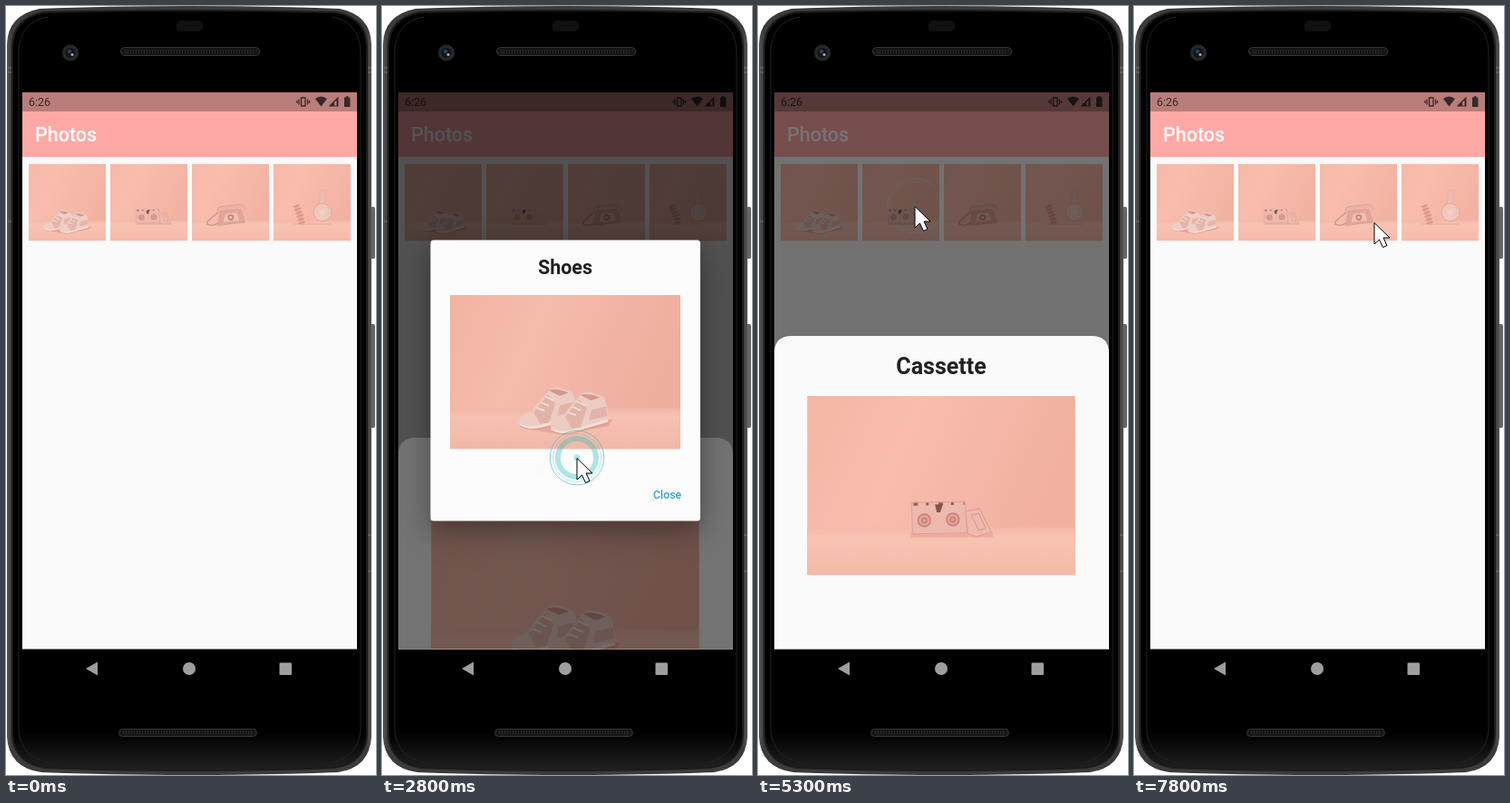
Recreate the animation shown at these times as an HTML page. Size 408 px wide and 846 px high, loop 8000 ms.

```html
<!DOCTYPE html>
<html lang="en">
<head>
<meta charset="utf-8">
<title>Photos</title>
<style>
  html, body { margin: 0; width: 100%; height: 100%; overflow: hidden; background: #fff; }
  svg { display: block; }
  #stage { width: 100vw; height: 100vh; }
  text { font-family: Roboto, sans-serif; }
  .title { font-weight: 700; fill: #212121; text-anchor: middle; }
  #card { filter: drop-shadow(0 9px 12px rgba(0, 0, 0, .24)) drop-shadow(0 12px 22px rgba(0, 0, 0, .16)); }
</style>
</head>
<body>
<svg id="stage" viewBox="0 0 408 846">
  <defs>
    <linearGradient id="wall" x2="1" y2=".3">
      <stop offset="0" stop-color="#f4b6a5"/><stop offset=".4" stop-color="#f8bdad"/><stop offset="1" stop-color="#f1b0a0"/>
    </linearGradient>
    <linearGradient id="floor" x2="0" y2="1">
      <stop offset="0" stop-color="#f4b8a8"/><stop offset=".2" stop-color="#f9c3b4"/><stop offset="1" stop-color="#f5baa9"/>
    </linearGradient>
    <linearGradient id="rim">
      <stop offset="0" stop-color="#585858"/><stop offset=".012" stop-color="#3b3b3b"/>
      <stop offset=".988" stop-color="#3b3b3b"/><stop offset="1" stop-color="#585858"/>
    </linearGradient>
    <linearGradient id="glass" x2="0" y2="1">
      <stop offset=".95" stop-color="#000"/><stop offset="1" stop-color="#222"/>
    </linearGradient>
    <clipPath id="screen"><path d="M18 95h369v612.500H18z"/></clipPath>

    <g id="room">
      <path fill="url(#wall)" d="M0 0h300v200H0z"/>
      <path fill="url(#floor)" d="M0 147h300v53H0z"/>
    </g>
    <g id="shoe">
      <path fill="#efcec5" d="M131 172C130 164 137 160 147 157L166 134Q172 124 184 126L201 133Q207 150 206 165L161 178Q139 183 131 172z"/>
      <path fill="#dfa79c" opacity=".6" d="M150 158L168 135L178 147L170 172L158 173zM184 149l19-4 2 12-24 6z"/>
      <path fill="none" stroke="#fae2dc" stroke-width="3" d="M132 174Q142 181 161 176L205 163"/>
      <path fill="none" stroke="#fae2dc" stroke-width="2" d="M153 152l11 4M159 145l11 5M165 138l11 5"/>
      <path fill="none" stroke="#d8968a" d="M132 176Q144 183 161 179L206 166"/>
      <path fill="#d79a8e" d="M170 130Q180 126 195 133L184 137z"/>
    </g>
    <symbol id="shoes" viewBox="0 0 300 200">
      <use href="#room"/>
      <path fill="#dd9a8c" opacity=".6" d="M92 168Q140 158 212 162L206 170L150 181Q110 178 92 168z"/>
      <use href="#shoe" x="-41" y="-6"/><use href="#shoe"/>
    </symbol>
    <symbol id="cassette" viewBox="0 0 300 200">
      <use href="#room"/>
      <path fill="#e3a194" opacity=".6" d="M116 152h92v6H116z"/>
      <path fill="#edb9ae" stroke="#dda094" d="M117 119l60-1 2 35-61 1z"/>
      <path fill="none" stroke="#975d52" stroke-width="3" stroke-dasharray="5 9 3 11" d="M119 121l57-1"/>
      <path fill="#86564d" d="M143 121h9l-3 9h-4z"/>
      <g fill="#e3a095" stroke="#c48276" stroke-width="1.500">
        <circle cx="131" cy="139" r="7"/><circle cx="163" cy="138" r="7"/>
        <circle cx="131" cy="139" r="2.500"/><circle cx="163" cy="138" r="2.500"/>
      </g>
      <path fill="#efb9ae" stroke="#d99f93" d="M177 129l16-3 13 26-17 5-9-3z"/>
      <path fill="none" stroke="#d3958a" d="M184 133l8-2 8 17-8 2z"/>
    </symbol>
    <symbol id="phone" viewBox="0 0 300 200">
      <use href="#room"/>
      <path fill="none" stroke="#d09184" stroke-width="3" d="M124 121Q100 140 90 150Q85 160 104 159Q118 157 122 149"/>
      <path fill="#e2a598" stroke="#c98a7d" d="M124 122l52-4 12 34-72 8z"/>
      <path fill="#efc0b3" d="M136 130l30-3 7 20-41 4z"/>
      <circle cx="151" cy="139" r="8" fill="#c48579"/><circle cx="151" cy="139" r="4" fill="#efc0b3"/>
      <path fill="none" stroke="#e9b3a6" stroke-width="8" stroke-linecap="round" d="M119 122Q120 112 134 114L170 110Q184 107 186 117"/>
      <path fill="none" stroke="#cb8d80" d="M116 127Q114 109 133 110L170 106Q187 104 190 119"/>
    </symbol>
    <symbol id="paddle" viewBox="0 0 300 200">
      <use href="#room"/>
      <path fill="#e9ab9d" opacity=".5" d="M100 154h100v4H100z"/>
      <path fill="none" stroke="#eaa79a" stroke-width="13" stroke-linecap="round" d="M110 112Q118 132 123 152"/>
      <path fill="none" stroke="#da9285" stroke-width="18" stroke-dasharray="3 6" d="M109 108Q119 132 124 157"/>
      <path fill="#eebcaf" stroke="#dda092" d="M171 69h13l2 38h-17z"/>
      <circle cx="177" cy="126" r="23" fill="#f3cec4" stroke="#dfa59a" stroke-width="2"/>
      <circle cx="177" cy="126" r="15" fill="none" stroke="#e6b3a8" stroke-width="14" stroke-dasharray="1 3"/>
    </symbol>
  </defs>

  <!-- handset -->
  <path fill="#666" d="M402 221h3.500q1.500 0 1.500 3v51q0 3-1.500 3H402zM402 350h3.500q1.500 0 1.500 3v108q0 3-1.500 3H402z"/>
  <path fill="url(#rim)" d="M1 42Q2 10 37 3Q110 0 203 0Q296 0 368 3Q402 10 403 42V804Q401 838 366 843Q296 846 203 846Q110 846 39 843Q3 838 1 804z"/>
  <path fill="none" stroke="#777" d="M2 68h5M2 73h5M398 68h5M398 73h5M2 237h5M398 582h5M398 622h5"/>
  <path fill="url(#glass)" stroke="#1c1c1c" stroke-width="2" d="M7 44Q8 13 42 7Q110 5 203 5Q296 5 364 7Q397 13 398 44V802Q396 833 362 838Q296 841 203 841Q110 841 43 838Q9 833 7 802z"/>
  <path fill="none" stroke="#222" d="M14 50Q15 18 46 12M391 50Q390 18 360 12M14 796Q16 826 47 832M391 796Q389 826 358 832M14 50V796M391 50V796"/>
  <rect x="188" y="16" width="29" height="12" rx="5" fill="#101010"/>
  <g fill="#161616" stroke="#363636">
    <rect x="126.500" y="45.500" width="153" height="9" rx="4.500"/><rect x="124.500" y="795.500" width="152" height="8" rx="4"/>
  </g>
  <path fill="none" stroke="#282828" stroke-width="4" stroke-dasharray="1 2" d="M131 50h144M129 799.500h143"/>
  <circle cx="71" cy="51.500" r="9" fill="#282828"/><circle cx="71" cy="51.500" r="5.500" fill="#11151c"/>
  <circle cx="70" cy="50" r="2" fill="#34496a"/><circle cx="73" cy="53.500" r="1.500" fill="#a4acb6"/>
  <g fill="#9e9e9e">
    <path d="M88 729l13-7.500v15z"/><circle cx="202" cy="729" r="7"/><rect x="301.500" y="722.500" width="13.500" height="13.500" rx="1"/>
  </g>

  <g clip-path="url(#screen)">
    <path fill="#fafafa" d="M18 95h369v613H18z"/>
    <path fill="#ffa9a6" d="M18 95h369v71H18z"/>
    <path fill="#b97d7a" d="M18 95h369v21H18z"/>
    <g fill="#382a29">
      <text x="25" y="110" font-size="12.500">6:26</text>
      <path fill="none" stroke="#382a29" stroke-width="1.300" d="M325.500 101h4.500v9h-4.500zM323 102.500v6M332.500 102.500v6M321 104v3M334.500 104v3"/>
      <path d="M341 102q6.500-5 13 0l-6.500 8.500zM355.500 110.500h11v-11z"/>
      <path fill="#b97d7a" d="M362 106v3.500h2.500v-6z"/>
      <path d="M373 100.500h1.800v-1.200h2.800v1.200h1.900V111H373z"/>
    </g>
    <text x="32" y="149" font-size="21.500" font-weight="500" fill="#fff">Photos</text>
    <g id="thumbs"></g>

    <rect id="sheetShade" x="18" y="95" width="369" height="613"/>
    <g id="sheet">
      <path fill="#fafafa" d="M18 708V382Q18 363 37 363H368Q387 363 387 382V708z"/>
      <text class="title" x="202" y="404.500" font-size="25"></text>
      <use class="photo" x="54" y="429" width="296" height="197"/>
    </g>
    <rect id="cardShade" x="18" y="95" width="369" height="613"/>
    <g id="card">
      <rect x="53.500" y="257.500" width="297.500" height="309" rx="3.500" fill="#fff"/>
      <text class="title" x="202" y="295" font-size="21.500"></text>
      <use class="photo" x="75" y="318" width="254" height="169.500"/>
      <text x="299" y="542" font-size="12.300" font-weight="500" fill="#36a3d3">Close</text>
    </g>
  </g>

  <g id="ripple" fill="none" stroke="#2fbcc2">
    <circle id="halo"/><circle id="echo" opacity=".5"/><circle id="band"/>
    <circle r="3.500" fill="#2fbcc2" stroke="none" opacity=".6"/>
  </g>
  <path id="cursor" fill="#fff" stroke="#000" stroke-linejoin="round" d="M0 .5V24l5.500-5 4 8.500 4.500-2-4-8.500h7z"/>
</svg>
<script>
const LOOP = 8000, STEP = 100, TAP_DELAY = 75;
const $ = id => document.getElementById(id);
const set = (el, attrs) => { for (const k in attrs) el.setAttribute(k, attrs[k]); };
const clamp = v => Math.max(0, Math.min(1, v));

function bezier(x1, y1, x2, y2) {
  const at = (a, b, s) => 3 * (1 - s) * (1 - s) * s * a + 3 * (1 - s) * s * s * b + s * s * s;
  return x => {
    let lo = 0, hi = 1;
    for (let i = 0; i < 20; i++) {
      const mid = (lo + hi) / 2;
      if (at(x1, x2, mid) < x) lo = mid; else hi = mid;
    }
    return x <= 0 ? 0 : x >= 1 ? 1 : at(y1, y2, lo);
  };
}
const ease = bezier(.25, .1, .25, 1);
const easeOut = bezier(0, 0, .58, 1);
const decelerate = bezier(0, 0, .2, 1);

// One visit per photo: tap the thumbnail, tap the sheet, tap Close.
const visits = [
  { name: 'Shoes', photo: '#shoes', taps: [1590, 2590, 3790] },
  { name: 'Cassette', photo: '#cassette', taps: [4890, 6111, 7290] },
];
const taps = visits.flatMap(v => v.taps);

// Pointer stops: time, x, y
const stops = [
  [200, 40, 259], [600, 107, 242], [700, 107, 242], [1000, 83, 241],
  [2000, 83, 241], [2400, 215, 497], [3300, 215, 497], [3600, 301, 535],
  [3700, 305, 537], [4150, 305, 537], [4700, 173, 220],
  [5350, 173, 220], [6000, 225, 489], [6350, 225, 489], [6800, 321, 510],
  [7050, 320, 537], [7400, 320, 537], [7800, 265, 238], [LOOP, 265, 238],
];

function pointer(t) {
  const i = Math.max(1, stops.findIndex(s => s[0] > t));
  const [t0, x0, y0] = stops[i - 1], [t1, x1, y1] = stops[i];
  const p = clamp((t - t0) / (t1 - t0)), e = p * p * (3 - 2 * p);
  return [x0 + (x1 - x0) * e, y0 + (y1 - y0) * e];
}

// Visibility of a route opened by one tap and closed by another
const route = (t, open, close, rise, fall) =>
  clamp(Math.min((t - open - TAP_DELAY) / rise, 1 - (t - close - TAP_DELAY) / fall));

function drawRipple(t) {
  const tap = taps.findLast(time => time <= t);
  const age = t - tap;
  const on = age < 500;
  $('ripple').style.display = on ? '' : 'none';
  if (!on) return;
  const r = 8 + 22 * (1 - (1 - clamp(age / 300)) ** 4);
  set($('ripple'), { transform: `translate(${pointer(tap)})`, opacity: clamp(1.1 - age / 430) });
  set($('halo'), { r });
  set($('echo'), { r: Math.max(0, r - 3.5), opacity: age > 50 ? .5 : 0 });
  set($('band'), { r: r - 8.7, 'stroke-width': Math.min(6, 2 * (r - 8.7)), opacity: clamp(1.3 - age / 300) });
}

function draw(t) {
  const { name, photo, taps: [first, second, third] } = visits[t < 4500 ? 0 : 1];
  document.querySelectorAll('.title').forEach(el => { el.textContent = name; });
  document.querySelectorAll('.photo').forEach(el => set(el, { href: photo }));

  const sheet = route(t, first, second, 250, 200);
  const card = route(t, second, third, 150, 150);
  set($('sheet'), { transform: `translate(0 ${345 * (1 - decelerate(sheet))})` });
  set($('sheetShade'), { opacity: .54 * ease(sheet) });
  set($('cardShade'), { opacity: .54 * ease(card) });
  set($('card'), { opacity: easeOut(card) });

  drawRipple(t);
  $('cursor').style.display = t < 200 ? 'none' : '';
  set($('cursor'), { transform: `translate(${pointer(t)})` });
}

$('thumbs').innerHTML = ['shoes', 'cassette', 'phone', 'paddle'].map((id, i) =>
  `<svg x="${25 + 90 * i}" y="173.5" width="85" height="85" viewBox="0 0 85 85">
     <use href="#${id}" x="-21.25" width="127.5" height="85"/></svg>`).join('');

const start = performance.now();
function frame() {
  const t = (performance.now() - start) % LOOP;
  draw(Math.floor(t / STEP) * STEP);
  requestAnimationFrame(frame);
}
frame();
</script>
</body>
</html>
```
